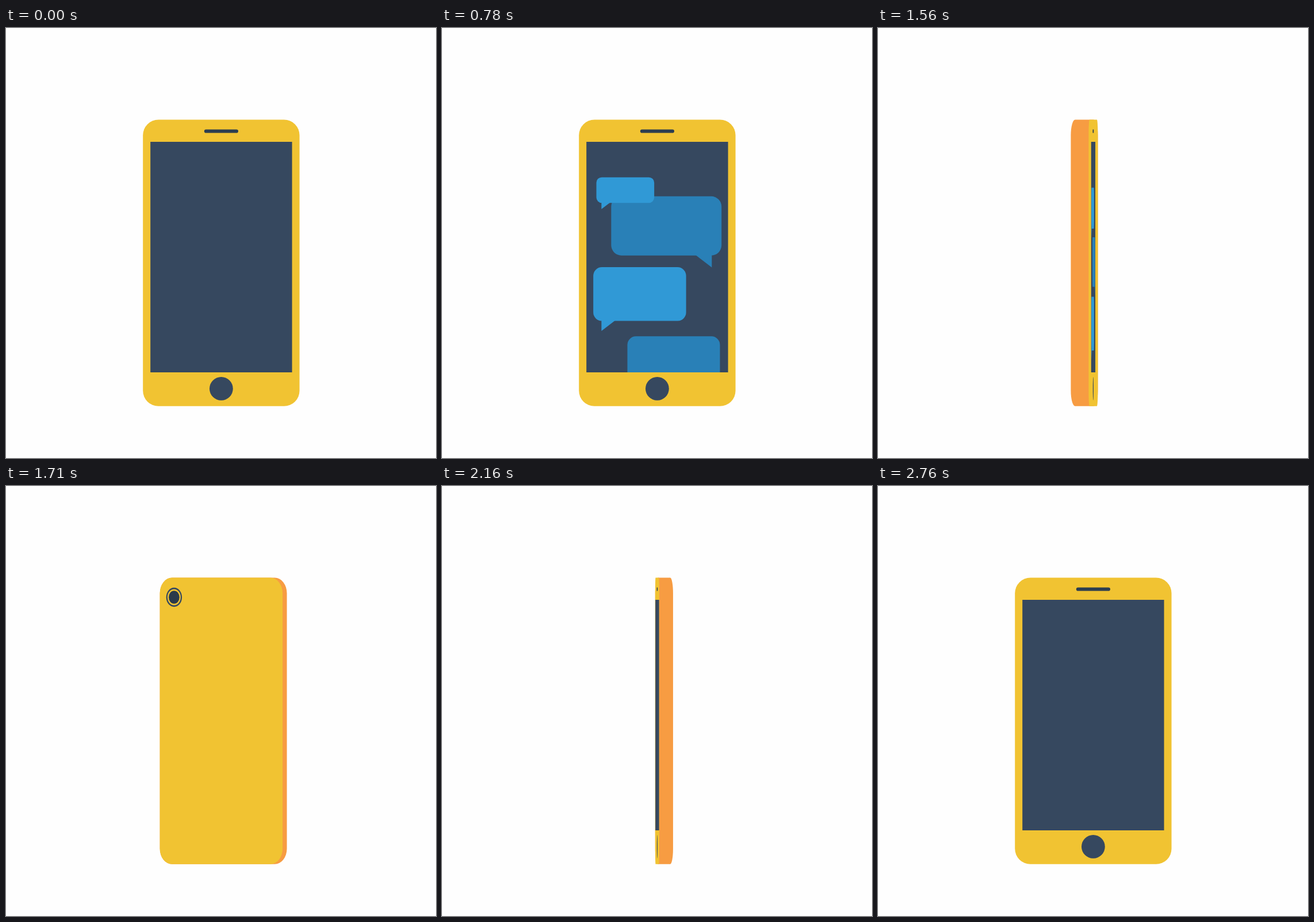
Animation, 748 px wide and 748 px high, one loop 3000 ms. Source, as an HTML page:

```html
<!DOCTYPE html>
<html lang="en">
<head>
<meta charset="utf-8">
<title>Phone messages</title>
<style>
html, body { margin: 0; width: 100%; height: 100%; overflow: hidden; background: #fefefe; }
svg { display: block; width: 100vw; height: 100vh; }
</style>
</head>
<body>
<svg viewBox="0 0 748 748">
  <defs>
    <clipPath id="glass"><rect x="-123.2" y="198" width="246.4" height="401"/></clipPath>
  </defs>
  <rect id="side" y="159.5" height="498.3" ry="27" fill="#f79c42"/>
  <rect id="face" y="159.5" height="498.3" ry="27" fill="#f1c332"/>
  <g id="front">
    <rect x="-29.6" y="176.4" width="59.2" height="6.2" rx="3.1" fill="#2c3e50"/>
    <rect x="-123.2" y="198" width="246.4" height="401" fill="#36485f"/>
    <circle cy="627.4" r="20.4" fill="#36485f"/>
    <g id="chat" clip-path="url(#glass)"></g>
  </g>
  <g id="back">
    <ellipse cx="-104.7" cy="193.5" rx="17.5" ry="16.7" fill="#36485f"/>
    <ellipse cx="-104.7" cy="193.5" rx="14.7" ry="14" fill="#f1c332"/>
    <ellipse cx="-104.7" cy="193.5" rx="11.9" ry="11.3" fill="#2a3a4a"/>
  </g>
</svg>
<script>
const FRAME = 30, LOOP = 3000, CX = 374.4, WIDTH = 272.4, RADIUS = 27;
const $ = id => document.getElementById(id);
const side = $('side'), face = $('face'), front = $('front'), back = $('back'), chat = $('chat');

const clamp = v => Math.min(1, Math.max(0, v));
const smooth = v => { v = clamp(v); return v * v * (3 - 2 * v); };

function make(tag, attrs, parent) {
  const el = document.createElementNS('http://www.w3.org/2000/svg', tag);
  for (const key in attrs) el.setAttribute(key, attrs[key]);
  return parent.appendChild(el);
}

function set(el, attrs) {
  for (const key in attrs) el.setAttribute(key, attrs[key]);
}

// Bubbles grow from the tip of their tail; the lowest one appears first.
const bubbles = [
  { right: true,  y: 640,   h: 86.3, start: 8.5,  drop: 115 },
  { right: false, y: 527,   h: 93.3, start: 13.5, drop: 51.3 },
  { right: true,  y: 416.4, h: 86.3, start: 18.5, drop: 51.3 },
  { right: false, y: 315,   h: 71.2, start: 23.5, drop: 51.3 }
];

for (const b of bubbles) {
  b.x = b.right ? 94.9 : -97;
  b.g = make('g', { fill: b.right ? '#2980b7' : '#3099d6' }, chat);
  make('rect', {
    x: b.right ? -146.8 : -14.2, y: -b.h - 17.4, width: 161, height: b.h, rx: 15
  }, b.g);
  make('path', { d: `M0 0V-19H${b.right ? -24.5 : 24.5}L${b.right ? -22.7 : 22.7} -17.4Z` }, b.g);
}

function pop(f) {
  return f < 5 ? 1.25 * smooth(f / 5) : 1.25 - 0.25 * smooth((f - 5) / 8);
}

// Turn angle in degrees against frame count, joined by a monotone curve.
const turn = [
  [44, 0], [45, 6], [52, 88.3], [58, 150], [62.5, 178],
  [65, 198.4], [72, 271.5], [77, 336], [80.5, 360]
];
const rise = i => (turn[i + 1][1] - turn[i][1]) / (turn[i + 1][0] - turn[i][0]);

function slope(i) {
  if (i === 0 || i === turn.length - 1) return 0;
  const a = rise(i - 1), b = rise(i);
  return 2 * a * b / (a + b);
}

function angle(f) {
  const last = turn.length - 1;
  if (f <= turn[0][0]) return 0;
  if (f >= turn[last][0]) return 360;
  let i = 0;
  while (f > turn[i + 1][0]) i++;
  const [x0, y0] = turn[i], [x1, y1] = turn[i + 1];
  const w = x1 - x0, u = (f - x0) / w, e = smooth(u);
  return y0 + (y1 - y0) * e
    + w * u * (1 - u) * ((1 - u) * slope(i) - u * slope(i + 1));
}

function drawPhone(f) {
  const deg = angle(f), rad = deg * Math.PI / 180;
  const c = Math.abs(Math.cos(rad)), s = Math.abs(Math.sin(rad));
  const firstHalf = deg < 180;
  const facing = deg < 90 || deg > 270;
  const depth = (firstHalf ? 31 : 24) * s ** 3;
  const w = WIDTH * c + (firstHalf ? 8 * s ** 9 : 0);
  const toLeft = deg % 180 < 90;

  set(face, { x: CX - w / 2, width: w, rx: RADIUS * w / WIDTH });
  set(side, {
    x: CX - w / 2 - (toLeft ? depth : 0),
    width: w + depth,
    rx: Math.max(RADIUS * c, firstHalf ? 7.5 : 5)
  });
  side.style.display = depth > 0.01 ? '' : 'none';
  front.style.display = facing ? '' : 'none';
  back.style.display = facing ? 'none' : '';
  (facing ? front : back).setAttribute('transform', `translate(${CX} 0) scale(${c} 1)`);
  chat.style.display = firstHalf ? '' : 'none';
}

function drawChat(f) {
  const slide = smooth((f - 30) / 10);
  for (const b of bubbles) {
    const k = pop(f - b.start);
    b.g.setAttribute('transform', `translate(${b.x} ${b.y + b.drop * slide}) scale(${k})`);
  }
}

function draw(ms) {
  const f = Math.floor((ms % LOOP) / FRAME);
  drawChat(f);
  drawPhone(f);
}

const begin = performance.now();
function tick() {
  draw(performance.now() - begin);
  requestAnimationFrame(tick);
}
draw(0);
requestAnimationFrame(tick);
</script>
</body>
</html>
```
